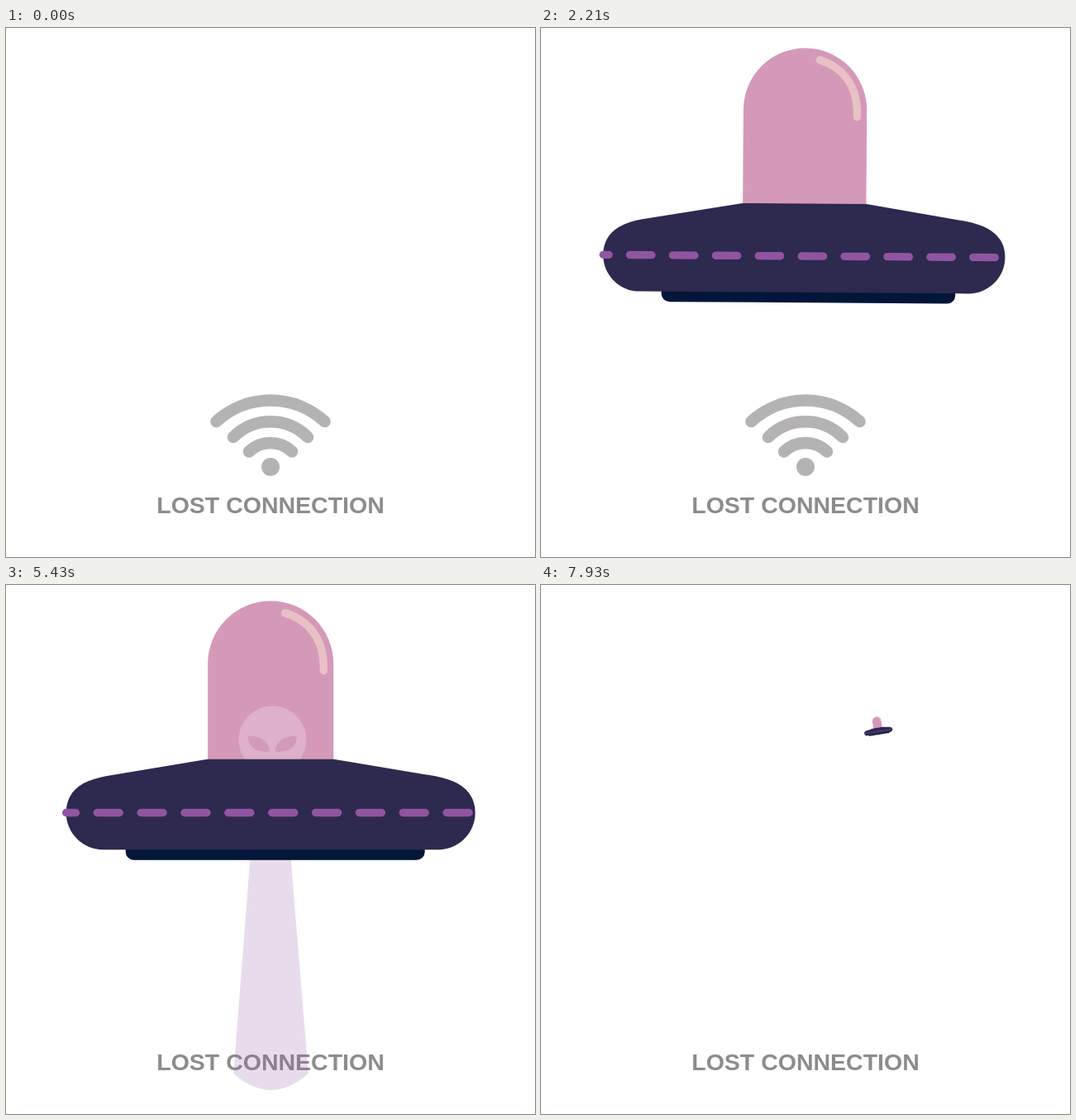
These frames come from a looping animation (640x640 px, 8000 ms). An HTML page:

```html
<!DOCTYPE html>
<html lang="en">
<head>
<meta charset="utf-8">
<title>Lost connection</title>
<style>
  html, body { margin: 0; width: 100%; height: 100%; overflow: hidden; background: #fff; }
  svg { display: block; width: 100%; height: 100%; }
  text { font: bold 28.5px "Liberation Sans", Arial, sans-serif; fill: #8c8c8c; text-anchor: middle; }
  .wifi path { fill: none; stroke: #b4b2b3; stroke-width: 14.5; stroke-linecap: round; }
  .wifi circle { fill: #b4b2b3; }
</style>
</head>
<body>
<svg viewBox="0 0 640 640">
  <text x="320" y="587">LOST CONNECTION</text>
  <g class="wifi" id="wifi">
    <path d="M254.5 476A97 97 0 0 1 385.5 476"/>
    <path d="M275 495A63.5 63.5 0 0 1 365 495"/>
    <path d="M294 512.5A37.4 37.4 0 0 1 346 512.5"/>
    <circle cx="320" cy="531" r="11"/>
  </g>
  <path id="beam" fill="#9055a2"/>
  <g id="ship">
    <path d="M243.5 214V95.5a76 76 0 0 1 152 0V214Z" fill="#d499b9"/>
    <g id="alien">
      <circle cx="321.7" cy="187.5" r="41" fill="#deb0cb"/>
      <g fill="#d499b9">
        <path d="M292 183C304 182 318 188 318 202C304 203 292 198 292 183Z"/>
        <path d="M351 183C339 182 325 188 325 202C339 203 351 198 351 183Z"/>
      </g>
    </g>
    <path d="M337 34C366 43 385 66 383.5 104" fill="none" stroke="#e8c1c5" stroke-width="9.5" stroke-linecap="round"/>
    <rect x="144" y="308" width="362" height="25" rx="10" fill="#011638"/>
    <path d="M243 211H396L519 231.5C548 237 567 250 567 276C567 300 547 320.5 522 320.5H117C92 320.5 72 300 72 276C72 250 90 237 120 231.5Z" fill="#2e294e"/>
    <path id="lights" d="M72 275.7H567" fill="none" stroke="#9055a2" stroke-width="9.5" stroke-linecap="round" stroke-dasharray="27 25.85"/>
  </g>
</svg>
<script>
const LOOP = 8000, FPS = 14, DASH = 52.85;
const $ = id => document.getElementById(id);
const wifi = $('wifi'), beam = $('beam'), ship = $('ship'), alien = $('alien'), lights = $('lights');

// time, x, y, scale, angle
const flight = [
  [0, 465, 168, 0, 4],
  [71, 443, 174, .025, 4],
  [200, 385, 192, .085, 2],
  [420, 268, 218, .19, -2],
  [650, 165, 243, .285, -6],
  [860, 141, 271, .39, -8.5],
  [1070, 187, 294.5, .501, -9.1],
  [1300, 226, 294, .632, -7.5],
  [1710, 283, 284, .844, -3],
  [2210, 318.3, 276, .982, .4],
  [2570, 319.5, 275.5, 1, 0],
  [4400, 319.5, 275.5, 1, 0],
  [5430, 320.2, 275.5, 1, 0],
  [5950, 321, 276, 1, .2],
  [6500, 347, 283, .875, 5.2],
  [6860, 392.8, 289.4, .6786, 6.84],
  [7200, 447, 264, .485, 3],
  [7500, 485, 221, .31, -3],
  [7710, 482, 187, .19, -7],
  [7930, 407.6, 177, .069, -9],
  [8000, 375, 175, .03, -9]
];

const clamp = v => Math.max(0, Math.min(1, v));
const smooth = (t, a, b) => { const u = clamp((t - a) / (b - a)); return u * u * (3 - 2 * u); };

function slope(i, c) {
  const rate = j => (flight[j + 1][c] - flight[j][c]) / (flight[j + 1][0] - flight[j][0]);
  if (i === 0) return rate(0);
  if (i === flight.length - 1) return rate(i - 1);
  const a = rate(i - 1), b = rate(i);
  return a * b <= 0 ? 0 : 2 * a * b / (a + b);
}

// Monotone cubic through the flight keys
function pose(t) {
  let i = 0;
  while (i < flight.length - 2 && t >= flight[i + 1][0]) i++;
  const p = flight[i], q = flight[i + 1], h = q[0] - p[0], u = (t - p[0]) / h, v = 1 - u;
  return [1, 2, 3, 4].map(c =>
    v * v * (1 + 2 * u) * p[c] + u * u * (3 - 2 * u) * q[c] +
    h * u * v * (v * slope(i, c) - u * slope(i + 1, c)));
}

function drawBeam(k) {
  const top = 76 * k ** 1.5, low = 113.5 * k ** 1.22;
  beam.setAttribute('d', `M${320 - top} 330L${320.5 - low} 591Q320.5 631 ${320.5 + low} 591L${320 + top} 330Z`);
  beam.setAttribute('opacity', .43 * k);
}

function render(t) {
  const [x, y, s, r] = pose(t);
  ship.setAttribute('transform', `translate(${x} ${y}) rotate(${r}) scale(${s}) translate(-319.5 -275.7)`);
  ship.style.display = s > .005 ? '' : 'none';

  const shift = 20.5 - .0314 * (t - 4290);
  lights.setAttribute('stroke-dashoffset', -(((shift % DASH) + DASH) % DASH));

  const sunk = 1 - smooth(t, 2600, 3350) + smooth(t, 6500, 7460);
  alien.setAttribute('transform', `translate(0 ${66 * sunk})`);
  alien.style.display = sunk < 1 ? '' : 'none';

  drawBeam(smooth(t, 2700, 3350) * (1 - smooth(t, 5200, 5640)));

  [...wifi.children].forEach((part, i) => {
    const u = Math.max(0, (t - 3930 - i * 40) / 75);
    part.setAttribute('transform', `translate(0 ${-Math.min(220, u * u)})`);
  });
  wifi.style.display = t < 5300 ? '' : 'none';
}

function tick() {
  const t = performance.now() % LOOP;
  render(Math.floor(t * FPS / 1000 + .08) * 1000 / FPS % LOOP);
  requestAnimationFrame(tick);
}
tick();
</script>
</body>
</html>
```
